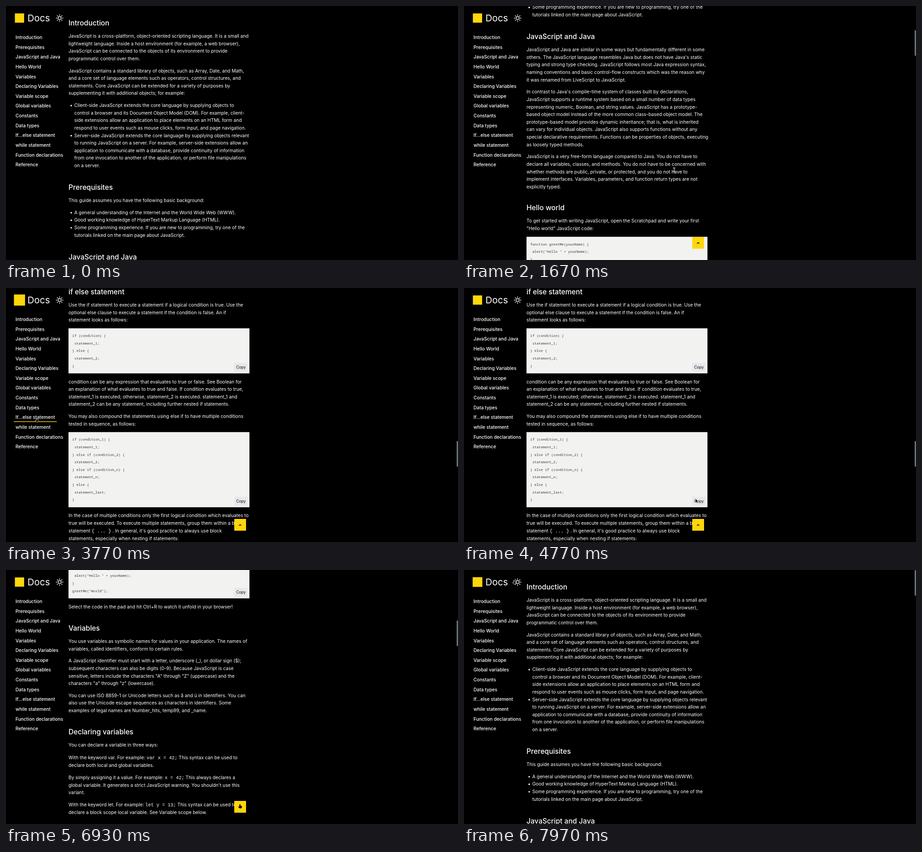
Animation of 998 by 561 pixels, one loop 8 s. Source, as an HTML page with a canvas:

```html
<!DOCTYPE html>
<html lang="en">
<head>
<meta charset="utf-8">
<title>Docs</title>
<style>
html, body { margin: 0; width: 100%; height: 100%; overflow: hidden; background: #000; }
canvas { display: block; width: 998px; height: 561px; }
</style>
</head>
<body>
<canvas id="stage"></canvas>
<script>
const W = 998, H = 561, LOOP = 8000, STEP = 100 / 3;
const YELLOW = '#ffd60a';
const LEFT = 138, COLUMN = 399.5, LINE = 16.62, GAP = 10;

// "# title @y" heading, "- " list item, ">" code line, ~inline code~
const PAGE = `
# Introduction @37.2

JavaScript is a cross-platform, object-oriented scripting language. It is a small and
lightweight language. Inside a host environment (for example, a web browser),
JavaScript can be connected to the objects of its environment to provide
programmatic control over them.

JavaScript contains a standard library of objects, such as Array, Date, and Math,
and a core set of language elements such as operators, control structures, and
statements. Core JavaScript can be extended for a variety of purposes by
supplementing it with additional objects; for example:

- Client-side JavaScript extends the core language by supplying objects to
  control a browser and its Document Object Model (DOM). For example, client-
  side extensions allow an application to place elements on an HTML form and
  respond to user events such as mouse clicks, form input, and page navigation.
- Server-side JavaScript extends the core language by supplying objects relevant
  to running JavaScript on a server. For example, server-side extensions allow an
  application to communicate with a database, provide continuity of information
  from one invocation to another of the application, or perform file manipulations
  on a server.

# Prerequisites @400.2

This guide assumes you have the following basic background:

- A general understanding of the Internet and the World Wide Web (WWW).
- Good working knowledge of HyperText Markup Language (HTML).
- Some programming experience. If you are new to programming, try one of the
  tutorials linked on the main page about JavaScript.

# JavaScript and Java @554

JavaScript and Java are similar in some ways but fundamentally different in some
others. The JavaScript language resembles Java but does not have Java's static
typing and strong type checking. JavaScript follows most Java expression syntax,
naming conventions and basic control-flow constructs which was the reason why
it was renamed from LiveScript to JavaScript.

In contrast to Java's compile-time system of classes built by declarations,
JavaScript supports a runtime system based on a small number of data types
representing numeric, Boolean, and string values. JavaScript has a prototype-
based object model instead of the more common class-based object model. The
prototype-based model provides dynamic inheritance; that is, what is inherited
can vary for individual objects. JavaScript also supports functions without any
special declarative requirements. Functions can be properties of objects, executing
as loosely typed methods.

JavaScript is a very free-form language compared to Java. You do not have to
declare all variables, classes, and methods. You do not have to be concerned with
whether methods are public, private, or protected, and you do not have to
implement interfaces. Variables, parameters, and function return types are not
explicitly typed.

# Hello world @932.2

To get started with writing JavaScript, open the Scratchpad and write your first
"Hello world" JavaScript code:

>function greetMe(yourName) {
> alert("Hello " + yourName);
>}
>greetMe("World");

Select the code in the pad and hit Ctrl+R to watch it unfold in your browser!

# Variables @1144.8

You use variables as symbolic names for values in your application. The names of
variables, called identifiers, conform to certain rules.

A JavaScript identifier must start with a letter, underscore (_), or dollar sign ($);
subsequent characters can also be digits (0-9). Because JavaScript is case
sensitive, letters include the characters "A" through "Z" (uppercase) and the
characters "a" through "z" (lowercase).

You can use ISO 8859-1 or Unicode letters such as å and ü in identifiers. You can
also use the Unicode escape sequences as characters in identifiers. Some
examples of legal names are Number_hits, temp99, and _name.

# Declaring variables @1374.2

You can declare a variable in three ways:

With the keyword var. For example: ~var x = 42;~ This syntax can be used to
declare both local and global variables.

By simply assigning it a value. For example: ~x = 42;~ This always declares a
global variable. It generates a strict JavaScript warning. You shouldn't use this
variant.

With the keyword let. For example: ~let y = 13;~ This syntax can be used to
declare a block scope local variable. See Variable scope below.

# Variable scope

When you declare a variable outside of any function, it is called a global variable,
because it is available to any other code in the current document. When you
declare a variable within a function, it is called a local variable, because it is
available only within that function.

JavaScript before ECMAScript 2015 does not have block statement scope; rather,
a variable declared within a block is local to the function (or global scope) that the
block resides within. For example the following code will log 5, because the scope
of x is the function (or global context) within which x is declared, not the block,
which in this case is an if statement.

>if (true) {
> var x = 5;
>}
>console.log(x); // 5

This behavior changes, when using the let declaration introduced in ECMAScript
2015.

>if (true) {
> let y = 5;
>}
>console.log(y); // ReferenceError: y is not defined

# Global variables

Global variables are in fact properties of the global object. In web pages the
global object is window, so you can set and access global variables using the
window.variable syntax.

Consequently, you can access global variables declared in one window or frame
from another window or frame by specifying the window or frame name.

# Constants

You can create a read-only, named constant with the const keyword. The syntax
of a constant identifier is the same as for a variable identifier: it must start with a
letter, underscore or dollar sign and can contain alphabetic, numeric, or
underscore characters.

>const PI = 3.14;

A constant cannot change value through assignment or be re-declared while the
script is running. It has to be initialized to a value.

You cannot declare a constant with the same name as a function or variable in
the same scope. For example:

>// THIS WILL CAUSE AN ERROR
>function f() {};
>const f = 5;
>// THIS WILL CAUSE AN ERROR ALSO
>function f() {
> const g = 5;
> var g;
>}

However, object attributes are not protected, so the following statement is
executed without problems.

>const MY_OBJECT = {"key": "value"};
>MY_OBJECT.key = "otherValue";

# Data types

The latest ECMAScript standard defines seven data types:

- Boolean. true and false.
- null. A special keyword denoting a null value.
- undefined. A top-level property whose value is undefined.
- Number. 42 or 3.14159.
- String. "Howdy"
- Symbol. A data type whose instances are unique and immutable.
- and Object

# if else statement @3093.3

Use the if statement to execute a statement if a logical condition is true. Use the
optional else clause to execute a statement if the condition is false. An if
statement looks as follows:

>if (condition) {
> statement_1;
>} else {
> statement_2;
>}

condition can be any expression that evaluates to true or false. See Boolean for
an explanation of what evaluates to true and false. If condition evaluates to true,
statement_1 is executed; otherwise, statement_2 is executed. statement_1 and
statement_2 can be any statement, including further nested if statements.

You may also compound the statements using else if to have multiple conditions
tested in sequence, as follows:

>if (condition_1) {
> statement_1;
>} else if (condition_2) {
> statement_2;
>} else if (condition_n) {
> statement_n;
>} else {
> statement_last;
>}

In the case of multiple conditions only the first logical condition which evaluates to
true will be executed. To execute multiple statements, group them within a block
statement ~{ ... }~ . In general, it's good practice to always use block
statements, especially when nesting if statements:`;

const NAV = ['Introduction', 'Prerequisites', 'JavaScript and Java', 'Hello World', 'Variables',
  'Declaring Variables', 'Variable scope', 'Global variables', 'Constants', 'Data types',
  'If...else statement', 'while statement', 'Function declarations', 'Reference'];

const canvas = document.getElementById('stage');
const ctx = canvas.getContext('2d');
const dpr = window.devicePixelRatio || 1;
canvas.width = W * dpr;
canvas.height = H * dpr;

const inter = (px, weight = 400) => `${weight} ${px}px Inter, sans-serif`;
const CODE = '7.72px "Noto Sans Mono", monospace';
const INLINE = '10.3px "Liberation Mono", monospace';
const HEAD = 15.6;

// One base size for the page, taken from the text column.
ctx.font = inter(10);
const BASE = 3980 / ctx.measureText(PAGE.split('\n')[3]).width;

function layout() {
  const items = [];
  let bottom = 0;
  for (const block of PAGE.trim().split('\n\n')) {
    if (block[0] === '#') {
      const [title, at] = block.slice(2).split(' @');
      const y = at ? +at : bottom + 38.7;
      items.push({ kind: 'head', text: title, y, h: 12 });
      bottom = y + 10.9;
      continue;
    }
    const lines = block.split('\n');
    const top = bottom + GAP;
    if (block[0] === '>') {
      const h = lines.length * LINE + 16.4;
      items.push({ kind: 'code', lines: lines.map(s => s.slice(1)), y: top, h });
      bottom = top + h;
      continue;
    }
    let y = top + LINE / 2;
    for (const line of lines) {
      const extra = line.includes('~') ? 0.4 : 0;
      const listed = /^(- |  )/.test(line);
      y += extra;
      items.push({ kind: 'text', text: listed ? line.slice(2) : line, dot: line[0] === '-',
        x: listed ? 150.7 : LEFT, y, h: 10 });
      y += LINE + extra;
    }
    bottom = y - LINE / 2;
  }
  return items;
}
const items = layout();

function write(text, x, y, px, weight, color = '#fff') {
  ctx.font = inter(px, weight);
  ctx.fillStyle = color;
  ctx.fillText(text, x, y + px * 0.36);
}

function box(x, y, w, h, color) {
  ctx.fillStyle = color;
  ctx.fillRect(x, y, w, h);
}

function disc(x, y, r, color) {
  ctx.fillStyle = color;
  ctx.beginPath();
  ctx.arc(x, y, r, 0, 7);
  ctx.fill();
}

function drawText(it, y) {
  let x = it.x;
  if (it.dot) disc(144, y + 0.6, 1.7, '#fff');
  it.text.split('~').forEach((part, i) => {
    ctx.font = i % 2 ? INLINE : inter(BASE);
    ctx.fillStyle = '#fff';
    ctx.fillText(part, x, y + BASE * 0.36);
    x += ctx.measureText(part).width;
  });
}

function drawCode(it, y, copied) {
  box(LEFT, y, COLUMN, it.h, '#f2f2f0');
  ctx.font = CODE;
  ctx.fillStyle = '#3a3a3c';
  it.lines.forEach((s, i) => ctx.fillText(s, 146.3, y + 8.2 + LINE * (i + 0.5) + 2.6));
  const left = copied ? 494 : 504;
  box(left, y + it.h - 23, 533 - left, 19, '#e7e7ec');
  write(copied ? 'Copied!' : 'Copy', left + 4.2, y + it.h - 13.6, BASE * 0.833, 400, '#111');
}

const clamp = v => Math.min(1, Math.max(0, v));
const ramp = (t, from, span) => clamp((t - from) / span);
const inOut = u => u < 0.5 ? 4 * u ** 3 : 1 - 4 * (1 - u) ** 3;
const smooth = u => u * u * (3 - 2 * u);
const mix = (a, b, u) => a + (b - a) * u;

const WHEEL_END = 710, ANCHOR = 3085;
function scrollAt(t) {
  if (t < 3100) return WHEEL_END * ramp(t, 570, 1600);
  if (t < 6000) return mix(WHEEL_END, ANCHOR, inOut(ramp(t, 3130, 290)));
  return ANCHOR * (1 - inOut(ramp(t, 6765, 298)));
}

// time, x, y, pointer shape from then on
const PATH = [
  [90, 470, 580, 'beam'], [450, 464, 362, 'beam'], [1900, 464, 362, 'beam'], [2170, 462, 362, 'beam'],
  [2260, 462, 362, 'arrow'], [2490, 68, 292, 'hand'], [4260, 68, 292, 'arrow'], [4800, 516, 472, 'hand'],
  [5250, 516, 472, 'arrow'], [5600, 432, 494, 'arrow'], [6050, 432, 494, 'arrow'],
  [6500, 517, 522, 'hand'], [7250, 517, 522, 'arrow'], [7820, 111, 27, 'hand'], [8000, 111, 27, 'hand']
];

const SHAPES = {
  arrow: new Path2D('M0 -5V4L2 2.2L3.4 5.2L4.8 4.6L3.5 1.7H6Z'),
  hand: new Path2D('M-1.5 -4Q-.6 -5 .3 -4V-1.4L3.2 -.6Q3.8 -.3 3.6 .6L3 4H-1.6L-3.8 .8L-3 .1L-1.5 1Z')
};

function drawPointer(t) {
  const i = PATH.findIndex((p, k) => k + 1 < PATH.length && t >= p[0] && t < PATH[k + 1][0]);
  if (i < 0) return;
  const [t0, x0, y0, shape] = PATH[i], [t1, x1, y1] = PATH[i + 1];
  const u = smooth(ramp(t, t0, t1 - t0));
  ctx.save();
  ctx.translate(mix(x0, x1, u), mix(y0, y1, u));
  if (shape === 'beam') {
    const beam = new Path2D('M-2.6 -4.5H2.6M0 -4.5V4.5M-2.6 4.5H2.6');
    ctx.strokeStyle = '#000';
    ctx.lineWidth = 2.2;
    ctx.stroke(beam);
    ctx.strokeStyle = scrollAt(t) > 660 ? '#333' : '#fff';
    ctx.lineWidth = 1.2;
    ctx.stroke(beam);
  } else {
    ctx.fillStyle = '#000';
    ctx.fill(SHAPES[shape]);
    ctx.strokeStyle = shape === 'hand' && scrollAt(t) > 0 && t > 6400 ? '#222' : '#ddd';
    ctx.lineWidth = 0.8;
    ctx.stroke(SHAPES[shape]);
  }
  ctx.restore();
}

function drawSun(x, y) {
  ctx.strokeStyle = '#fff';
  ctx.lineWidth = 1.4;
  ctx.lineCap = 'round';
  ctx.beginPath();
  ctx.arc(x, y, 3.4, 0, 7);
  for (let i = 0; i < 8; i++) {
    const c = Math.cos(i * Math.PI / 4), s = Math.sin(i * Math.PI / 4);
    ctx.moveTo(x + c * 6, y + s * 6);
    ctx.lineTo(x + c * 7.6, y + s * 7.6);
  }
  ctx.stroke();
  ctx.lineCap = 'butt';
}

function drawSidebar(t) {
  const pulse = [30, 3710, 7550].reduce((s, at) => s + Math.sin(Math.PI * ramp(t, at, 430)), 0);
  const side = 20.4 * (1 + 0.5 * pulse);
  box(29.8 - side / 2, 26.6 - side / 2, side, side, YELLOW);
  write('Docs', 47.6, 26.7, BASE * 2);
  drawSun(118.4, 26.7);
  NAV.forEach((name, i) => write(name, 21, 69.3 + 21.63 * i, BASE, 500));
  const line = smooth(ramp(t, 2480, 200)) * (1 - smooth(ramp(t, 4280, 200)));
  box(17, 294.5, 95 * line, 1.4, YELLOW);
}

function drawTopButton() {
  box(504, 510, 26, 26, YELLOW);
  ctx.strokeStyle = '#000';
  ctx.lineWidth = 1.3;
  ctx.stroke(new Path2D('M514.4 525L517 522.3L519.6 525'));
}

function draw(t) {
  const scroll = scrollAt(t);
  ctx.setTransform(dpr, 0, 0, dpr, 0, 0);
  box(0, 0, W, H, '#000');
  for (const it of items) {
    const y = it.y - scroll;
    if (y > H + 20 || y + it.h < -20) continue;
    if (it.kind === 'head') write(it.text, LEFT, y, HEAD, 500);
    else if (it.kind === 'text') drawText(it, y);
    else drawCode(it, y, it.lines.length === 9 && t > 5120 && t < 6400);
  }
  drawSidebar(t);
  if (scroll > 400) drawTopButton();
  if (t > 560) box(995, scroll * 0.1095 + 0.5, 3, 56, '#66737b');
  drawPointer(t);
}

const start = performance.now();
function tick() {
  const t = (performance.now() - start) % LOOP;
  draw(Math.floor((t + 6) / STEP) * STEP);
  requestAnimationFrame(tick);
}
tick();
</script>
</body>
</html>
```
